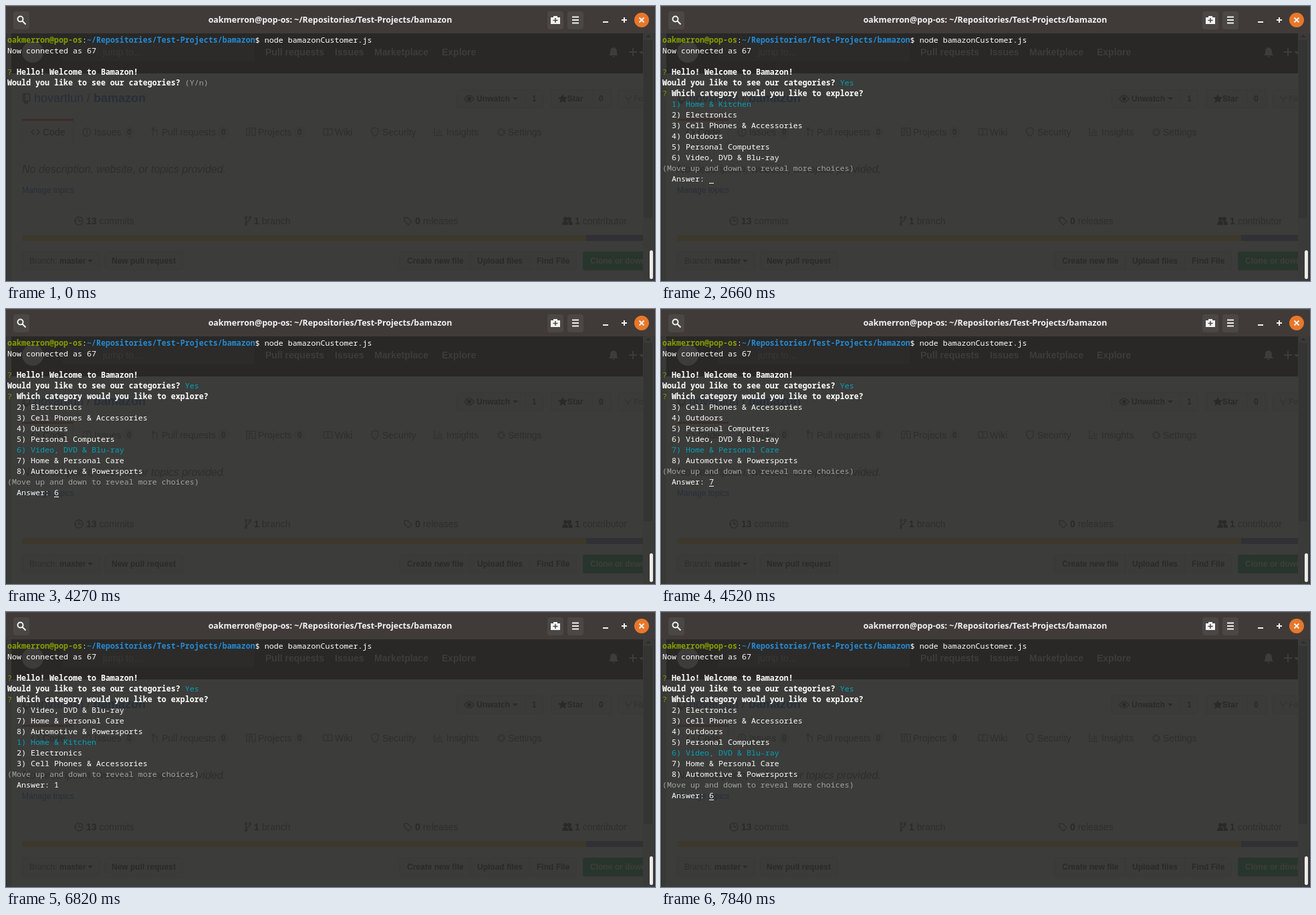
An HTML page that plays this animation: 971x412 px, repeating every 8000 ms.

```html
<!DOCTYPE html>
<html lang="en">
<head>
<meta charset="utf-8">
<title>Terminal</title>
<style>
html, body { margin: 0; height: 100%; overflow: hidden; background: #3c3c3b; }
svg { display: block; }
text { white-space: pre; }
#page { font: 14px "Liberation Sans", Arial, sans-serif; fill: #2e2e2f; }
#page .b { font-weight: bold; }
#page .s { font-size: 12px; }
#page .link { fill: #262f39; }
#page .dark { fill: #292a2a; }
#page .line { fill: none; stroke: #2e2e2f; stroke-width: 1.4; }
#page .box { fill: #3b3b3a; stroke: #383837; }
#page .nav { fill: #3d3c3b; }
#bar { fill: #f2f2f2; }
#bar .ink { fill: none; stroke: #f2f2f2; stroke-width: 2; }
#bar text { font: 600 12.45px "Noto Sans", "Open Sans", sans-serif; }
#term { font: 500 11.667px "Noto Sans Mono", "DejaVu Sans Mono", monospace; fill: #fff; }
#term .b { font-weight: bold; }
.green { fill: #859f00; }
.blue { fill: #268bd2; }
.cyan { fill: #00a3b8; }
.dim { fill: #a2a2a0; }
</style>
</head>
<body>
<svg width="971" height="412" viewBox="0 0 971 412">
  <clipPath id="view"><rect x="8" y="41" width="945" height="371"/></clipPath>
  <rect width="971" height="412" fill="#3c3c3b"/>
  <rect y="41" width="8" height="371" fill="#383837"/>
  <g id="page" clip-path="url(#view)">
    <rect x="8" y="41" width="945" height="60" fill="#292827"/>
    <rect x="85" y="55" width="287" height="28" rx="3" fill="#2c2b2a"/>
    <g class="nav b">
      <circle cx="40" cy="69" r="16"/>
      <text x="145" y="74" font-weight="400" fill="#383736">jump to...</text>
      <text x="388" y="74">Pull requests</text>
      <text x="492" y="74">Issues</text>
      <text x="551" y="74">Marketplace</text>
      <text x="652" y="74">Explore</text>
      <path d="M902 74l2-3v-3q0-5 5-6q5 1 5 6v3l2 3zM907 75h4q-2 3-4 0M932 68h5v-5h2v5h5v2h-5v5h-2v-5h-5zM947 68h8l-4 4z"/>
    </g>

    <path class="line" d="M25.500 131.500h10v11h-10zM28 131v11M28 142v4l2-1.500l2 1.500v-4"/>
    <g class="link" font-size="18">
      <text x="42" y="144">hovartlun</text><text x="121" y="144" fill="#2e2e2f">/</text>
      <text class="b" x="131" y="144">bamazon</text>
    </g>
    <rect class="box" x="674.500" y="125.500" width="129" height="27" rx="3"/>
    <rect class="box" x="815.500" y="125.500" width="90" height="27" rx="3"/>
    <rect class="box" x="915.500" y="125.500" width="60" height="27" rx="3"/>
    <path d="M777.500 126v26M877.500 126v26" stroke="#383837"/>
    <g class="b s dark">
      <text x="704" y="143">Unwatch</text><text x="787" y="143">1</text>
      <text x="840" y="143">Star</text><text x="887" y="143">0</text>
      <text x="939" y="143" fill="#343434">Fork</text>
      <path d="M758 137h8l-4 4zM833 132l2 4l5 1l-3.500 3l1 5l-4.500-2.500l-4.500 2.500l1-5l-3.500-3l5-1z"/>
      <path class="line" d="M686 139q7-10 14 0q-7 10-14 0z"/><circle cx="693" cy="139" r="3"/>
      <path class="line" stroke-opacity=".5" d="M927 134v3l4 3l4-3v-3M931 140v5"/>
    </g>

    <path d="M24.500 207V171H100.500V207" fill="none" stroke="#393938"/>
    <rect x="24" y="169" width="77" height="3" fill="#3a2e27"/>
    <path class="line" d="M42 185l-4 4l4 4M46 185l4 4l-4 4" stroke-width="2"/>
    <text class="dark" x="55" y="194">Code</text>
    <g id="tabs"></g>
    <g class="line" stroke-opacity=".7">
      <circle cx="121" cy="189" r="6"/><path d="M121 185v5M121 191v2"/>
      <path d="M220 184v11M226 195v-9h-4M360 183h13v11h-5v-8h-4v8h-4zM475 184h13v9h-13zM481.500 184v10M547 184l5-2l5 2v5q-1 4-5 6q-4-2-5-6zM641 182v12h13M645 192v-4M648 192v-8M651 192v-6"/>
      <circle cx="220" cy="184" r="1.500"/><circle cx="741" cy="189" r="4.500" stroke-width="3" stroke-dasharray="2.500 1"/>
    </g>

    <text x="24" y="250" font-size="16" font-style="italic">No description, website, or topics provided.</text>
    <text class="s link" x="24" y="280">Manage topics</text>

    <rect x="24.500" y="303.500" width="940" height="40" fill="none" stroke="#3a3a39"/>
    <g id="stats"></g>
    <g class="line">
      <circle cx="109" cy="322" r="6"/><path d="M109 318v4h4M102 322h4M359 318v8M365 318q0 4-6 6M596 317h5l6 6l-5 5l-6-6z"/>
      <circle cx="359" cy="317" r="1.500"/><circle cx="365" cy="317" r="1.500"/><circle cx="359" cy="327" r="1.500"/>
    </g>
    <g class="dark">
      <circle cx="837" cy="319" r="3"/><circle cx="843" cy="319" r="3"/>
      <path d="M832 328q0-6 5-6q4 0 4 6zM842 328q0-4-1-6q7-1 7 6z"/>
    </g>
    <rect x="24" y="343" width="844" height="9" fill="#3c382b"/>
    <rect x="868" y="343" width="90" height="9" fill="#303035"/>

    <rect class="box" x="24.500" y="368.500" width="116" height="27" rx="3"/>
    <rect class="box" x="148.500" y="368.500" width="116" height="27" rx="3"/>
    <rect class="box" x="589.500" y="368.500" width="264" height="27" rx="3"/>
    <path d="M694.500 369v26M783.500 369v26" stroke="#383837"/>
    <rect x="863" y="368" width="100" height="28" rx="3" fill="#28352c"/>
    <g class="b s dark">
      <text x="35" y="386" font-weight="400" fill="#2e2e2f">Branch:</text>
      <text x="80" y="386">master</text><path d="M122 380h8l-4 4z"/>
      <text x="158" y="386">New pull request</text>
      <text x="600" y="386">Create new file</text>
      <text x="705" y="386">Upload files</text>
      <text x="794" y="386">Find File</text>
      <text x="874" y="386" fill="#3d3f3c">Clone or download</text>
    </g>
  </g>

  <rect x="953" y="41" width="15" height="371" fill="#3a3a39"/>
  <rect x="954" y="51" width="13" height="267" fill="#343433"/>
  <path d="M957 47l4-4l4 4z" fill="#2b2b2a"/>
  <rect x="963" y="366" width="5" height="43" rx="2.500" fill="#ecebea"/>

  <g id="bar">
    <rect width="971" height="41" fill="#403b39"/>
    <path d="M0 .5H971" stroke="#4b4745"/>
    <g fill="#4b4745">
      <rect x="11" y="8" width="24" height="27" rx="4"/>
      <rect x="810" y="8" width="24" height="27" rx="4"/>
      <rect x="840" y="8" width="24" height="27" rx="4"/>
    </g>
    <circle class="ink" cx="21.500" cy="19.500" r="4"/>
    <path class="ink" d="M24.500 22.500l5 5M847 16.500h10M847 21h10M847 25.500h10M893 24h8M921 21h8M925 17v8"/>
    <path d="M819 15h6v2h4v10h-14v-10h4z"/>
    <path d="M822 18v7M818.500 21.500h7" stroke="#4b4745" stroke-width="1.500"/>
    <circle cx="951" cy="21" r="11" fill="#e8772a"/>
    <path class="ink" d="M947.500 17.500l7 7M954.500 17.500l-7 7"/>
    <text x="485" y="25" text-anchor="middle">oakmerron@pop-os: ~/Repositories/Test-Projects/bamazon</text>
  </g>
  <g id="term"></g>
  <path d="M.5 41V412M970.500 41V412" stroke="#2b2a29"/>
</svg>
<script>
const $ = id => document.getElementById(id);
const label = (x, y, s, cls = '') => `<text class="${cls}" x="${x}" y="${y}">${s}</text>`;

$('tabs').innerHTML = [[132, 'Issues', 184], [233, 'Pull requests', 325], [377, 'Projects', 439],
  [492, 'Wiki'], [563, 'Security'], [659, 'Insights'], [751, 'Settings']].map(([x, name, pill]) =>
  label(x, 194, name) + (pill ? `<rect x="${pill - 8}" y="181" width="16" height="16" rx="8" fill="#3a3a39"/>` +
    label(pill - 3, 193, '0', 'b s') : '')).join('');
$('stats').innerHTML = [[120, '13', 'commits'], [371, '1', 'branch'], [612, '0', 'releases'], [851, '1', 'contributor']]
  .map(([x, n, name]) => label(x, 327, `<tspan class="b dark">${n}</tspan> ${name}`)).join('');

const LOOP = 8000, CELL = 7, ROW = 16;
const ANSWERED = 1060, MENU = 1540;
const downKeys = [3170, 3400, 3650, 4090, 4270, 4520, 4740, 5060, 6890, 7310, 7480, 7680, 7840];
const cursorOff = [[0, 480], [2070, 2660], [5630, 6230], [6820, 6960]];
const choices = ['Home & Kitchen', 'Electronics', 'Cell Phones & Accessories', 'Outdoors', 'Personal Computers',
  'Video, DVD & Blu-ray', 'Home & Personal Care', 'Automotive & Powersports'];

const span = (cls, s) => `<tspan class="${cls}">${s.replace(/&/g, '&amp;')}</tspan>`;
const ask = s => span('green', '?') + span('b', ' ' + s);
const intro = [
  span('b green', 'oakmerron@pop-os') + ':' + span('b blue', '~/Repositories/Test-Projects/bamazon') + '$ node bamazonCustomer.js',
  'Now connected as 67', '', ask('Hello! Welcome to Bamazon!')];
const question = span('b', 'Would you like to see our categories? ');

// The pager shows 7 lines of a 9-line cycle; its blank line 0 is not printed.
function menu(moves) {
  const active = moves % 8, top = active - Math.min(3, moves), rows = [];
  for (let i = 0; i < 7; i++) {
    const n = (top + i + 9) % 9;
    if (n) rows.push(span(n === active + 1 ? 'cyan' : '', `  ${n}) ${choices[n - 1]}`));
  }
  return [ask('Which category would you like to explore?'), ...rows,
    span('dim', '(Move up and down to reveal more choices)'), '  Answer: ' + (moves ? active + 1 : '')];
}

function screen(t) {
  let lines, column;
  if (t < MENU) {
    const typed = t >= ANSWERED;
    lines = [...intro, question + span('dim', '(Y/n) ') + (typed ? 'y' : '')];
    column = typed ? 45 : 44;
  } else {
    lines = [...intro, question + span('cyan', 'Yes'), ...menu(downKeys.filter(k => k <= t).length)];
    column = 10;
  }
  const baseline = i => 55 + i * ROW;
  const hidden = cursorOff.some(([from, to]) => t >= from && t < to);
  return lines.map((s, i) => label(2, baseline(i), s)).join('') + (hidden ? '' :
    `<rect x="${2 + column * CELL}" y="${baseline(lines.length - 1) + 2}" width="${CELL}" height="1"/>`);
}

let shown;
function draw() {
  const html = screen(performance.now() % LOOP);
  if (html !== shown) $('term').innerHTML = shown = html;
  requestAnimationFrame(draw);
}
draw();
</script>
</body>
</html>
```
